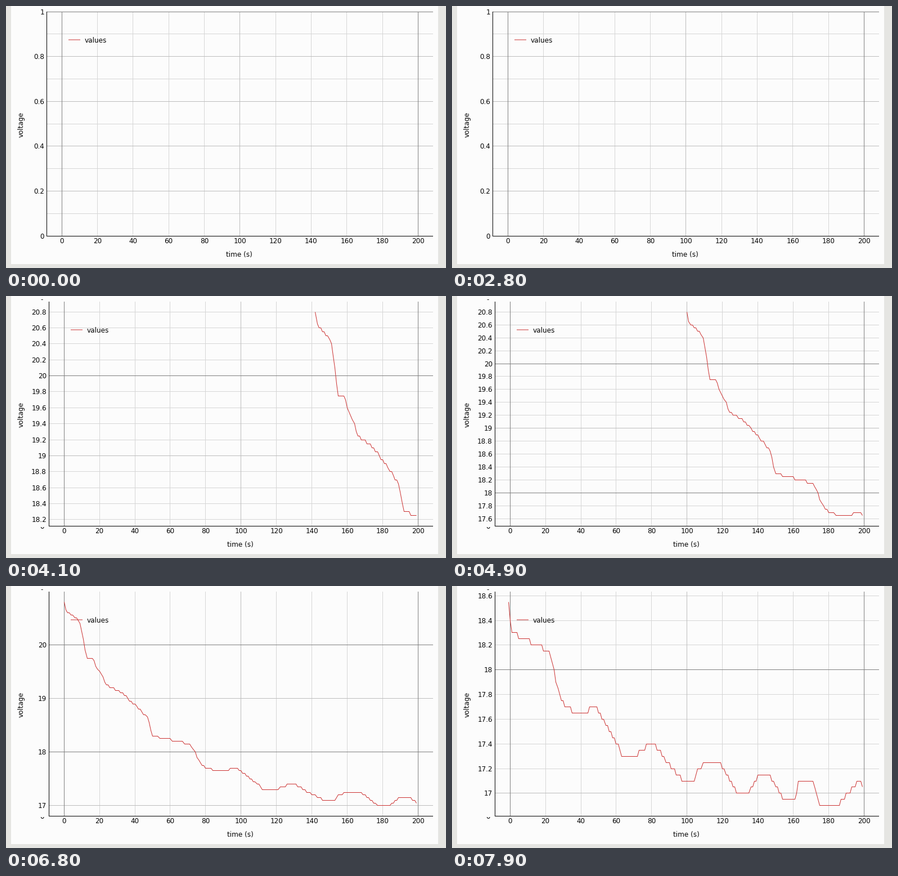
These frames come from a looping animation (782 by 465 pixels, 8 s). A matplotlib script:

```python
import math

import matplotlib.pyplot as plt
import numpy as np
from matplotlib.animation import FuncAnimation
from matplotlib.patches import Rectangle

W, H, DPI = 782, 465, 100
FRAMES, INTERVAL = 80, 100
TOP, BOTTOM, RIGHT = 10, 408, 759
PX = 72 / DPI
BORDER, PAPER, INK, TRACE = "#e5e5e2", "#fcfcfc", "#050505", "#cc3333"
GRID = ["#808080", "#bdbdbd", "#d6d6d6"]

# Turning points of the discharge: sample index, 0.05 V steps above 16.9 V.
TURNS = [(0, 78), (1, 75), (9, 70.4), (13, 57), (16, 57), (24, 47), (33, 44),
         (47, 35), (50, 28), (71, 25), (78, 17), (85, 15), (93, 15.4),
         (97, 16), (108, 11), (112, 8), (119, 8), (129, 10.3), (146, 4.3),
         (152, 4), (158, 7), (167, 7), (177, 2.4), (183, 2), (190, 5),
         (196, 5), (203, 1), (210, 1), (212, 4), (220, 4), (224, 0),
         (234, 0), (247, 4.2), (248, 3)]
VOLTS = 16.9 + 0.05 * np.round(np.interp(np.arange(249), *zip(*TURNS)))

START = 30
PACE = [(START, 2), (34, 22), (49, 100), (58, 150), (68, 200), (79, 249)]
WINDOW = 201

plt.rcParams["font.family"] = "DejaVu Sans"
fig = plt.figure(figsize=(W / DPI, H / DPI), dpi=DPI, facecolor=BORDER)
ax = fig.add_axes([0, 0, 1, 1])


def text(x, y, s, **kw):
    style = dict(ha="center", va="baseline", fontsize=12 * PX, color=INK)
    return ax.text(x, y, s, **{**style, **kw})


def line(xs, ys, color, z=1):
    ax.plot(xs, ys, color=color, lw=PX, zorder=z, snap=False,
            solid_capstyle="butt", solid_joinstyle="round")


def pixel(v):
    """Centre of the pixel that holds v."""
    return np.floor(v + 1e-6) + 0.5


def tick_levels(lo, hi, size):
    """Tick values grouped from coarse to fine, each with its spacing."""
    span = hi - lo
    ideal = span / max(2, math.log(size))
    unit = 10 ** math.floor(math.log10(ideal))
    steps = [m * unit for m in (1, 2, 10, 20, 100)]
    i = 0
    while steps[i + 1] <= ideal:
        i += 1
    spacings = [steps[i + 2], steps[i + 1]]
    if span / steps[i] <= size / min(size / 20, 30):
        spacings.append(steps[i])
    seen, levels = set(), []
    for step in spacings:
        first, last = math.ceil(lo / step - 1e-6), math.floor(hi / step + 1e-6)
        values = [round(k * step, 6) for k in range(first, last + 1)]
        levels.append((step, [v for v in values if v not in seen]))
        seen.update(values)
    return levels


def draw_axis(lo, hi, size, draw_grid, draw_label):
    labels = 0
    for depth, (step, values) in enumerate(tick_levels(lo, hi, size)):
        places = max(0, math.ceil(-math.log10(step) - 1e-9))
        show = labels < 6
        for v in values:
            draw_grid(v, GRID[depth], 1 + 0.1 * (2 - depth))
            if show:
                draw_label(v, f"{v:.{places}f}")
        labels += len(values) * show


def stale_mark(s, y, clip_top, clip_height):
    mark = text(68, y, s, ha="right", clip_on=True)
    mark.set_clip_path(Rectangle((50, clip_top), 22, clip_height,
                                 transform=ax.transData))


def draw(frame):
    ax.clear()
    ax.set(xlim=(0, W), ylim=(H, 0))
    ax.axis("off")
    ax.add_patch(Rectangle((9, 0), 759, 458, color=PAPER, lw=0, zorder=0))

    running = frame >= START
    left = 76 if running else 72
    x_zero = left + 27.2
    x_scale = (732.4 - x_zero) / 200
    lo, hi = 0.0, 1.0
    if running:
        count = int(round(np.interp(frame, *zip(*PACE))))
        shown = VOLTS[max(0, count - WINDOW):count]
        pad = (shown.max() - shown.min()) / math.sqrt(BOTTOM - TOP)
        lo, hi = shown.min() - pad, shown.max() + pad

    def to_x(v):
        return x_zero + v * x_scale

    def to_y(v):
        return TOP + (hi - v) / (hi - lo) * (BOTTOM - TOP)

    def grid_x(v, color, z):
        line([pixel(to_x(v))] * 2, [TOP, BOTTOM], color, z)

    def grid_y(v, color, z):
        line([left, RIGHT], [pixel(to_y(v))] * 2, color, z)

    draw_axis(-8.4, 208.4, RIGHT - left, grid_x,
              lambda v, s: text(to_x(v), 421, s))
    draw_axis(lo, hi, BOTTOM - TOP, grid_y,
              lambda v, s: text(left - 4, pixel(to_y(v)) + 4.5, s, ha="right"))

    line([left + 0.5] * 2, [TOP, BOTTOM + 1], "black", 3)
    line([left, RIGHT], [BOTTOM + 0.5] * 2, "black", 3)

    if running:
        xs = to_x(np.arange(200 - len(shown), 200))
        line(pixel(xs), pixel(to_y(shown)), TRACE, 4)
        stale_mark("1", 15, 0, 7)
        stale_mark("0", 413, 410, 5)

    line([left + 39, left + 60], [60, 60], TRACE, 5)
    text(left + 68, 65, "values", ha="left")
    text((left + RIGHT) / 2 - 1, 445, "time (s)")
    text(27, 210, "voltage", va="center", rotation=90)
    return []


anim = FuncAnimation(fig, draw, frames=FRAMES, interval=INTERVAL,
                     init_func=lambda: [], repeat=True, repeat_delay=0)
plt.show()
```
